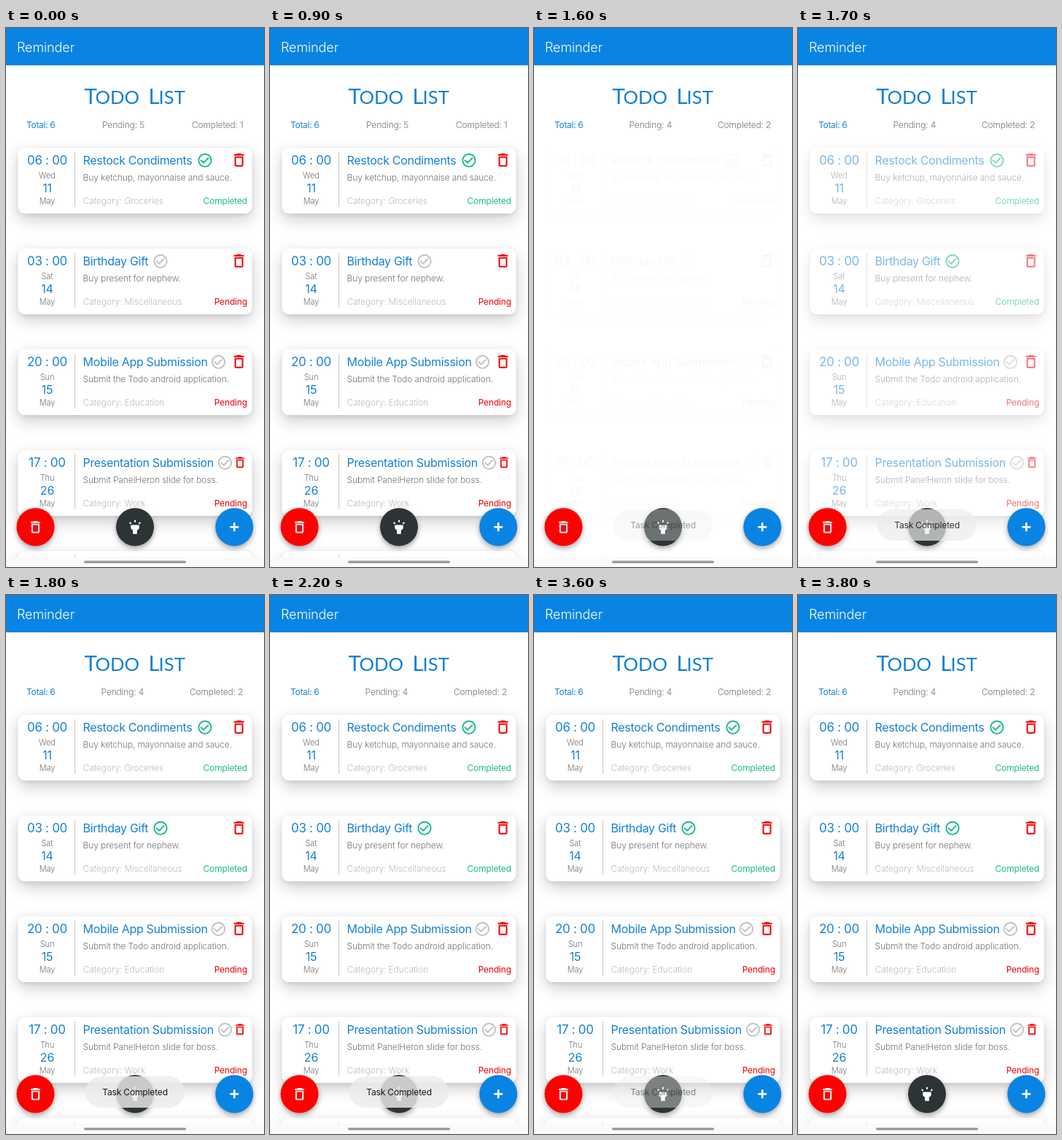
An HTML page with a canvas that plays this animation: 354x738 px, repeating every 4.1 s.

```html
<!DOCTYPE html>
<html lang="en">
<head>
<meta charset="utf-8">
<title>Reminder</title>
<style>
html, body { margin: 0; width: 100%; height: 100%; overflow: hidden; background: #fff; }
canvas { display: block; width: 100%; height: 100%; }
</style>
</head>
<body>
<canvas id="stage"></canvas>
<script>
const W = 354, H = 738, LOOP = 4100, STEP = 100;
const BLUE = '#0984e3', INK = '#1480d4', RED = '#f00006', GREEN = '#1cb991', DARK = '#2d3436';
const GREY = '#747474', PALE = '#bcbcbc';
const LIST_TOP = 145, LIST_END = 724, PITCH = 138;

const ICONS = {
  check: new Path2D('M16.59 7.58L10 14.17l-3.59-3.58L5 12l5 5 8-8zM12 2C6.48 2 2 6.48 2 12s4.48 10 10 10 10-4.48 10-10S17.52 2 12 2zm0 18c-4.42 0-8-3.58-8-8s3.58-8 8-8 8 3.58 8 8-3.58 8-8 8z'),
  trash: new Path2D('M6 19c0 1.1.9 2 2 2h8c1.1 0 2-.9 2-2V7H6v12zM8 9h8v10H8V9zm7.5-5l-1-1h-5l-1 1H5v2h14V4h-3.5z'),
  torch: new Path2D('M6 14l3 3v5h6v-5l3-3V9H6zm5-12h2v3h-2zM3.5 5.875L4.914 4.46l2.12 2.122L5.62 7.997zm13.46.71l2.123-2.12 1.414 1.414L18.375 8z')
};

const TASKS = [
  { time: '06 : 00', day: 'Wed', date: '11', title: 'Restock Condiments', note: 'Buy ketchup, mayonnaise and sauce.', group: 'Groceries', checkX: 273, done: true },
  { time: '03 : 00', day: 'Sat', date: '14', title: 'Birthday Gift', note: 'Buy present for nephew.', group: 'Miscellaneous', checkX: 212 },
  { time: '20 : 00', day: 'Sun', date: '15', title: 'Mobile App Submission', note: 'Submit the Todo android application.', group: 'Education', checkX: 291.5 },
  { time: '17 : 00', day: 'Thu', date: '26', title: 'Presentation Submission', note: 'Submit PanelHeron slide for boss.', group: 'Work', checkX: 300.5, small: true },
  null
];

const ratio = window.devicePixelRatio || 1;

function setup(canvas) {
  canvas.width = Math.round(W * ratio);
  canvas.height = Math.round(H * ratio);
  const c = canvas.getContext('2d');
  c.scale(ratio, ratio);
  return c;
}

function text(c, str, x, y, size, color, align = 'left', gap = -0.1, weight = 300) {
  c.font = `${weight} ${size}px Inter, sans-serif`;
  c.letterSpacing = gap + 'px';
  c.textAlign = align;
  c.fillStyle = color;
  c.fillText(str, x, y);
}

function icon(c, name, x, y, scale, color) {
  c.save();
  c.translate(x, y);
  c.scale(scale, scale);
  c.translate(-12, -12);
  c.fillStyle = color;
  c.fill(ICONS[name], 'evenodd');
  c.restore();
}

function pill(c, x, y, w, h, r, color) {
  c.beginPath();
  c.roundRect(x, y, w, h, r);
  c.fillStyle = color;
  c.fill();
}

function shadow(c, alpha, blur, dy) {
  c.shadowColor = `rgba(0,0,0,${alpha})`;
  c.shadowBlur = blur * ratio;
  c.shadowOffsetY = dy * ratio;
}

function card(c, task, y, done) {
  c.save();
  shadow(c, 0.2, 22, 8);
  pill(c, 16.5, y, 321, 90, 9, '#fff');
  shadow(c, 0.09, 6, 2);
  pill(c, 16.5, y, 321, 90, 9, '#fff');
  c.restore();
  c.fillStyle = '#cacaca';
  c.fillRect(94, y + 6, 1, 75);
  if (!task) return;

  text(c, task.time, 56.5, y + 23, 17, INK, 'center', -0.3, 400);
  text(c, task.day, 56.5, y + 41.5, 11, GREY, 'center');
  text(c, task.date, 56.5, y + 61, 16, INK, 'center', -0.2, 400);
  text(c, 'May', 56.5, y + 76.5, 11, GREY, 'center');

  text(c, task.title, 105.5, y + 23, 16, INK, 'left', -0.32, 400);
  text(c, task.note, 105.5, y + 45, 12, GREY);
  text(c, 'Category: ' + task.group, 105.5, y + 76.5, 12, PALE);
  text(c, done ? 'Completed' : 'Pending', 331, y + 76.5, 12, done ? GREEN : RED, 'right', -0.15, 400);
  icon(c, 'check', task.checkX, y + 17.3, 0.95, done ? GREEN : '#c2c2c2');
  icon(c, 'trash', task.small ? 321 : 319.6, y + 16.8, task.small ? 0.83 : 1, RED);
}

// The list is painted once per state so that it can fade as one layer.
function makeList(giftDone) {
  const canvas = document.createElement('canvas');
  const c = setup(canvas);
  c.beginPath();
  c.rect(0, LIST_TOP, W, LIST_END - LIST_TOP);
  c.clip();
  TASKS.forEach((task, i) => {
    card(c, task, 164 + i * PITCH, task && (task.done || (i === 1 && giftDone)));
  });
  return canvas;
}

const ctx = setup(document.getElementById('stage'));
const before = makeList(false), after = makeList(true);

function heading(str, x, size) {
  ctx.font = `400 ${size}px Lato, sans-serif`;
  ctx.letterSpacing = '0px';
  ctx.textAlign = 'left';
  ctx.fillStyle = INK;
  ctx.fillText(str, x, 103.5);
}

function button(x, color) {
  ctx.save();
  shadow(ctx, 0.36, 7, 3);
  pill(ctx, x - 26, 657.2, 52, 52, 26, color);
  ctx.restore();
}

function touchDot() {
  ctx.beginPath();
  ctx.arc(210.3, 319.3, 10.5, 0, Math.PI * 2);
  ctx.fillStyle = 'rgba(245,245,245,.7)';
  ctx.fill();
  ctx.strokeStyle = 'rgba(170,170,170,.6)';
  ctx.lineWidth = 1;
  ctx.stroke();
}

function toast(alpha) {
  if (alpha <= 0) return;
  ctx.save();
  ctx.globalAlpha = alpha;
  pill(ctx, 109, 659, 136, 43, 21.5, 'rgba(236,236,236,.82)');
  text(ctx, 'Task Completed', 177, 684.5, 12, '#141414', 'center', -0.15, 400);
  ctx.restore();
}

function listAlpha(t) {
  if (t < 1600 || t >= 1800) return 1;
  return t < 1700 ? 0.04 : 0.55;
}

function toastAlpha(t) {
  if (t < 1600 || t >= 3800) return 0;
  if (t < 1800) return t < 1700 ? 0.4 : 0.85;
  return Math.min(1, (3800 - t) / 400);
}

function draw(t) {
  const counted = t >= 1500;
  ctx.fillStyle = '#fff';
  ctx.fillRect(0, 0, W, H);

  ctx.globalAlpha = listAlpha(t);
  ctx.drawImage(t < 1700 ? before : after, 0, 0, W, H);
  if (t >= 1400 && t < 1700) touchDot();
  ctx.globalAlpha = 1;

  ctx.save();
  shadow(ctx, 0.15, 3, 0.5);
  ctx.fillStyle = BLUE;
  ctx.fillRect(0, 0, W, 51);
  ctx.restore();
  text(ctx, 'Reminder', 15, 32.5, 18, '#fff');

  heading('T', 107.5, 29.5);
  heading('ODO', 122.5, 25.7);
  heading('L', 195.5, 29.5);
  heading('IST', 209.5, 25.7);

  text(ctx, 'Total: 6', 28, 136.5, 12, INK, 'left', -0.3, 400);
  text(ctx, 'Pending: ' + (counted ? 4 : 5), counted ? 130.5 : 132, 136.5, 12, GREY, 'left', -0.15);
  text(ctx, 'Completed: ' + (counted ? 2 : 1), counted ? 252 : 255, 136.5, 12, GREY, 'left', -0.15);

  ctx.fillStyle = '#fafafa';
  ctx.fillRect(0, LIST_END, W, H - LIST_END);
  pill(ctx, 107, 729.5, 140, 3.2, 1.6, '#969696');

  button(40.5, '#ff0000');
  button(177, DARK);
  button(313.3, BLUE);
  icon(ctx, 'trash', 40.5, 683.3, 0.92, '#fff');
  icon(ctx, 'torch', 177, 683.3, 0.95, '#fff');
  pill(ctx, 307.3, 682, 12, 2.6, 0.6, '#fff');
  pill(ctx, 312, 677.3, 2.6, 12, 0.6, '#fff');

  toast(toastAlpha(t));
}

const start = performance.now();

function tick() {
  const t = (performance.now() - start) % LOOP;
  draw(Math.floor(t / STEP) * STEP);
  requestAnimationFrame(tick);
}
tick();
</script>
</body>
</html>
```
